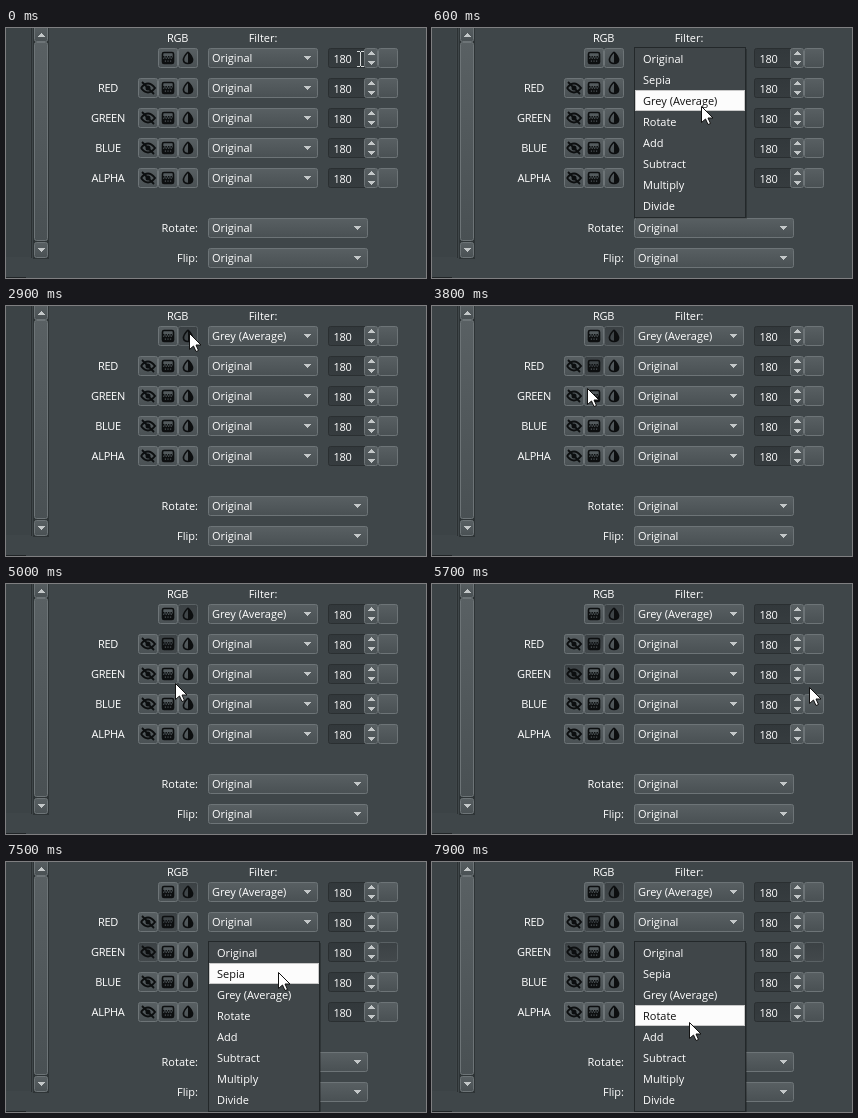
An HTML page with a canvas for the animation above (8 s loop, 420 px wide and 250 px high).

```html
<!DOCTYPE html>
<html lang="en">
<head>
<meta charset="utf-8">
<title>Channel filters</title>
<style>
html, body { margin: 0; width: 100%; height: 100%; overflow: hidden; background: #3f4649; }
canvas { display: block; width: 420px; height: 250px; }
</style>
</head>
<body>
<canvas id="stage"></canvas>
<script>
const LOOP = 8000, STEP = 100, ITEM = 21;
const INK = '#0d0f10', WHITE = '#fff', ARROW = '#c3c7c8';
const canvas = document.getElementById('stage');
const ratio = window.devicePixelRatio || 1;
canvas.width = 420 * ratio;
canvas.height = 250 * ratio;
const ctx = canvas.getContext('2d');
ctx.scale(ratio, ratio);

const CHANNELS = ['', 'RED', 'GREEN', 'BLUE', 'ALPHA'];
const FILTERS = ['Original', 'Sepia', 'Grey (Average)', 'Rotate', 'Add', 'Subtract', 'Multiply', 'Divide'];
const rowY = row => 30 + row * 30;
const rowAt = y => Math.round((y - 30) / 30);

// Each gesture eases the pointer to a point; it rests until the next one starts.
const START = { x: 354, y: 30 };
const go = (start, end, x, y) => ({ start, end, x, y });
const GESTURES = [
  go(0, 300, 284, 33), go(300, 600, 270, 79),
  go(1000, 1400, 244, 61), go(1500, 1800, 244, 26),
  go(1800, 2000, 345, 29), go(2000, 2200, 193, 28),
  go(2800, 2900, 184, 28), go(3100, 3400, 162, 61), go(3500, 3900, 155, 89),
  go(4900, 5100, 185, 110), go(5200, 5700, 378, 104), go(5700, 6100, 382, 89),
  go(6700, 6900, 366, 88), go(6900, 7200, 280, 90), go(7300, 7900, 258, 161)
];
const MENUS = [{ row: 0, from: 300, to: 900 }, { row: 2, from: 7300, to: LOOP }];
const CLICKS = [
  { row: 0, col: 2, at: 2900 }, { row: 1, col: 1, at: 3600 },
  { row: 2, col: 0, at: 5300 }, { row: 2, col: 3, at: 6400 }
];

const within = (t, from, to) => t >= from && t < to;
const ease = k => k + Math.sin(Math.PI * 2 * k) * -0.04;

function pointerAt(time) {
  const t = Math.floor(time / STEP) * STEP;
  let { x, y } = START;
  for (const g of GESTURES) {
    if (t <= g.start) break;
    const k = ease(Math.min(1, (t - g.start) / (g.end - g.start)));
    x += (g.x - x) * k;
    y += (g.y - y) * k;
  }
  return { x: Math.round(x), y: Math.round(y), hidden: within(t, 4400, 5000) };
}

function fill(color, x, y, w, h) {
  ctx.fillStyle = color;
  ctx.fillRect(x, y, w, h);
}

function text(label, x, y, align = 'left', color = WHITE) {
  ctx.font = '11px "Open Sans", "Noto Sans", sans-serif';
  ctx.letterSpacing = label === label.toUpperCase() ? '-0.3px' : '0px';
  ctx.textAlign = align;
  ctx.fillStyle = color;
  ctx.fillText(label, x, y);
}

function box(x, y, w, h, top = '#596063', bottom = '#495053', edge = '#6d7477') {
  const shade = ctx.createLinearGradient(0, y, 0, y + h);
  shade.addColorStop(0, top);
  shade.addColorStop(1, bottom);
  ctx.beginPath();
  ctx.roundRect(x + .5, y + .5, w - 1, h - 1, 2);
  ctx.fillStyle = shade;
  ctx.fill();
  ctx.strokeStyle = edge;
  ctx.lineWidth = 1;
  ctx.stroke();
}

// Pixel-stepped triangle, seven wide and four high; dir 1 points down.
function triangle(x, y, dir) {
  for (let i = 0; i < 4; i++)
    fill(ARROW, x - 3 + i, y + dir * (i - 1.5) - .5, 7 - 2 * i, 1);
}

function button(x, cy, on) {
  if (on) box(x, cy - 10, 20, 20, '#3b4144', '#43494c', '#5a6164');
  else box(x, cy - 10, 20, 20);
}

function combo(x, cy, w, label) {
  box(x, cy - 10, w, 20);
  text(label, x + 4, cy + 4);
  triangle(x + w - 11, cy, 1);
}

function stroke(width) {
  ctx.strokeStyle = INK;
  ctx.lineWidth = width;
  ctx.stroke();
}

function eyeIcon(x, y) {
  ctx.beginPath();
  ctx.moveTo(x - 7, y);
  ctx.quadraticCurveTo(x, y - 9, x + 7, y);
  ctx.quadraticCurveTo(x, y + 9, x - 7, y);
  stroke(2);
  ctx.beginPath();
  ctx.arc(x, y, 2.5, 0, Math.PI * 2);
  ctx.fillStyle = INK;
  ctx.fill();
  ctx.beginPath();
  ctx.moveTo(x - 6, y - 6);
  ctx.lineTo(x + 6, y + 6);
  stroke(1.8);
}

function gridIcon(x, y) {
  ctx.beginPath();
  ctx.roundRect(x - 5.5, y - 5.5, 11, 11, 1.5);
  stroke(1.6);
  for (let i = 0; i < 8; i++)
    fill(INK, x - 5 + i % 4 * 2.5 + (i > 3) * 1.25, y - 2 + (i > 3) * 1.5, 1.4, 1.5);
  fill(INK, x - 5, y + 1, 10, 4);
  for (let i = -1; i < 2; i++) fill('#50575a', x - .6 + i * 2.6, y + 2.5, 1.2, 1.2);
}

function dropIcon(x, y) {
  const half = side => {
    ctx.beginPath();
    ctx.moveTo(x, y - 6);
    ctx.bezierCurveTo(x + side * 7, y + 1, x + side * 5, y + 5.5, x, y + 5.5);
  };
  half(-1);
  stroke(1.6);
  half(1);
  stroke(1.6);
  ctx.fillStyle = INK;
  ctx.fill();
}

const ICONS = [eyeIcon, gridIcon, dropIcon];

function spinner(cy, hover) {
  box(322, cy - 10, 50, 20, '#32383b', '#363c3f', '#2a2f31');
  text('180', 327.5, cy + 5);
  const top = hover ? '#737a7d' : '#596063', bottom = hover ? '#656c6f' : '#495053';
  box(358, cy - 10, 14, 20, top, bottom);
  triangle(365, cy - 5, -1);
  triangle(365, cy + 5, 1);
}

function scrollPanel() {
  fill('#3c4346', 0, 0, 24, 229);
  fill('#2b3032', 25, 0, 1, 230);
  fill('#2e3436', 27, 0, 16, 231);
  box(28, -3, 14, 17);
  box(28, 14, 14, 199);
  box(28, 214, 14, 16);
  triangle(35, 7, -1);
  triangle(35, 222, 1);
  fill('#202426', 0, 249, 20, 1);
}

function menu(top, pointer) {
  fill('rgba(0,0,0,.25)', 204, top + 2, 111, 170);
  fill('#23282a', 202, top, 112, 171);
  fill('#404649', 203, top + 1, 110, 169);
  const active = Math.floor((pointer.y - top - 1) / ITEM);
  FILTERS.forEach((label, i) => {
    const y = top + 1 + i * ITEM, on = i === active;
    if (on) {
      fill('#c9c9c9', 203, y, 110, ITEM);
      fill('#fcfcfc', 204, y + 1, 108, ITEM - 2);
    }
    text(label, 211, y + 15, 'left', on ? '#111' : WHITE);
  });
}

function arrowPointer(x, y) {
  ctx.beginPath();
  [[0, 0], [0, 16], [4, 12.5], [6.5, 18], [9, 17], [6.5, 11.5], [11.5, 11.5]]
    .forEach(([dx, dy]) => ctx.lineTo(x + dx - .5, y + dy - .5));
  ctx.closePath();
  ctx.fillStyle = WHITE;
  ctx.fill();
  ctx.strokeStyle = '#111';
  ctx.lineWidth = 1;
  ctx.stroke();
}

function beamPointer(x, y) {
  fill('#d9dcdc', x, y - 6, 1, 14);
  for (const dy of [-7, 8]) {
    fill('#d9dcdc', x - 3, y + dy, 3, 1);
    fill('#d9dcdc', x + 1, y + dy, 3, 1);
  }
}

function draw(time) {
  const pointer = pointerAt(time);
  const open = MENUS.find(m => within(time, m.from, m.to));
  fill('#3f4649', 0, 0, 420, 250);
  scrollPanel();
  text('RGB', 171.5, 14, 'center');
  text('Filter:', 257, 14, 'center');

  CHANNELS.forEach((label, row) => {
    const cy = rowY(row);
    const isOn = col => CLICKS.some(c => c.row === row && c.col === col && time >= c.at);
    text(label, 102, cy + 4, 'center');
    ICONS.forEach((icon, col) => {
      if (!row && !col) return;
      const x = 132 + col * 20;
      button(x, cy, isOn(col));
      icon(x + 10, cy);
    });
    combo(202, cy, 110, FILTERS[row === 0 && time >= 900 ? 2 : 0]);
    spinner(cy, row === rowAt(pointer.y) && within(pointer.x, 358, 373));
    button(372, cy, isOn(3));
  });

  ['Rotate:', 'Flip:'].forEach((label, i) => {
    const cy = 200 + i * 30;
    text(label, 192, cy + 4, 'right');
    combo(202, cy, 160, 'Original');
  });

  if (open) menu(rowY(open.row) - 11, pointer);
  if (pointer.hidden) return;
  const cursor = within(pointer.x, 322, 358) ? beamPointer : arrowPointer;
  cursor(pointer.x, pointer.y);
}

function frame(now) {
  draw(now % LOOP);
  requestAnimationFrame(frame);
}
draw(0);
requestAnimationFrame(frame);
</script>
</body>
</html>
```
